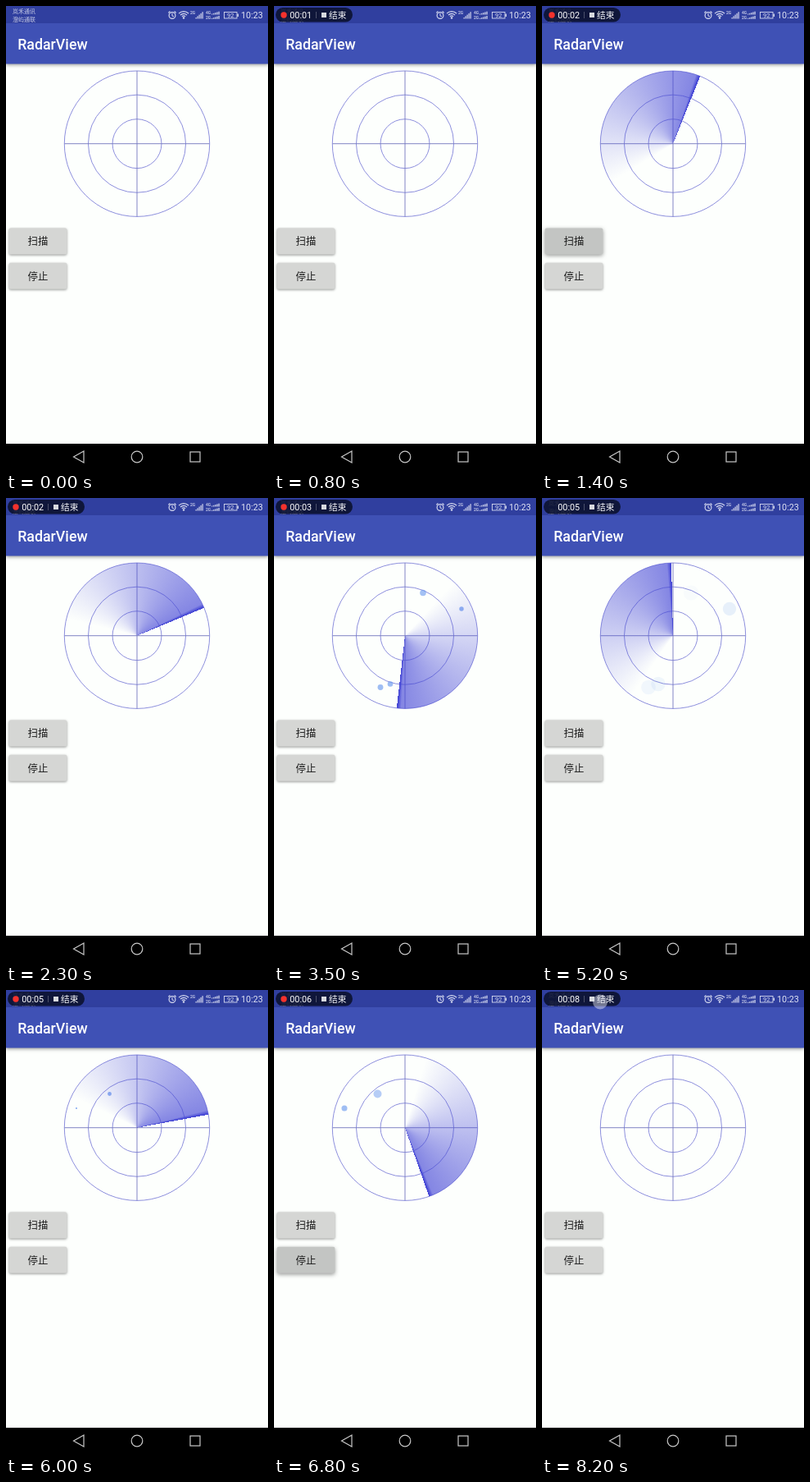
Recreate the animation shown at these times as an HTML page with a canvas. Size 320 px wide and 565 px high, loop 8.3 s.

```html
<!DOCTYPE html>
<html lang="zh">
<head>
<meta charset="utf-8">
<title>RadarView</title>
<style>
  html, body { margin: 0; width: 100%; height: 100%; overflow: hidden; background: #fdfffd; }
  canvas { display: block; width: 320px; height: 565px; }
</style>
</head>
<body>
<canvas id="stage" width="320" height="565"></canvas>
<script>
const ctx = document.getElementById('stage').getContext('2d');
const LOOP = 8300, STEP = 100, TAU = Math.PI * 2;
const LATIN = 'Roboto, "Noto Sans CJK SC", "Noto Sans CJK", sans-serif';
const HAN = '"Noto Sans CJK SC", "Noto Sans CJK", sans-serif';
const CENTER = { x: 160, y: 167.7 }, RADIUS = 88.7;
const SCAN = { start: 1150, stop: 7000 };

// [time in ms, value]
const SWEEP = [[1150, 0], [1400, 22], [2300, 67.5], [3500, 186.6], [4400, 277.8], [6000, 439.6], [7000, 541]];
const CLOCK = [[0, 1.1], [1400, 2.5], [2300, 2.9], [3500, 3.74], [4400, 4.48], [6000, 5.84], [8200, 8.05]];

const DROP_LIFE = 3000, DROP_GROWTH = 0.0032;
const DROPS = [
  { x: 182, y: 115.5, born: 2310 }, { x: 130, y: 230.5, born: 2430 },
  { x: 142, y: 226.5, born: 2470 }, { x: 229, y: 135, born: 2650 },
  { x: 126.5, y: 126.5, born: 5250 }, { x: 86, y: 144, born: 5700 }
];

function track(points, t) {
  let i = 1;
  while (i < points.length - 1 && t > points[i][0]) i++;
  const [t0, v0] = points[i - 1], [t1, v1] = points[i];
  return v0 + (v1 - v0) * (t - t0) / (t1 - t0);
}

function rect(x, y, w, h, color) {
  ctx.fillStyle = color;
  ctx.fillRect(x, y, w, h);
}

function disc(x, y, r, color) {
  ctx.fillStyle = color;
  ctx.beginPath();
  ctx.arc(x, y, r, 0, TAU);
  ctx.fill();
}

function ring(x, y, r, color, width = 1) {
  ctx.strokeStyle = color;
  ctx.lineWidth = width;
  ctx.beginPath();
  ctx.arc(x, y, r, 0, TAU);
  ctx.stroke();
}

function path(points, color, width = 1, closed = false) {
  ctx.strokeStyle = color;
  ctx.lineWidth = width;
  ctx.beginPath();
  points.forEach(([x, y]) => ctx.lineTo(x, y));
  if (closed) ctx.closePath();
  ctx.stroke();
}

function text(str, x, y, font, color, align = 'left') {
  ctx.font = font;
  ctx.fillStyle = color;
  ctx.textAlign = align;
  ctx.fillText(str, x, y);
}

function roundRect(x, y, w, h, r, color) {
  ctx.fillStyle = color;
  ctx.beginPath();
  ctx.roundRect(x, y, w, h, r);
  ctx.fill();
}

function signal(x, color) {
  for (let i = 0; i < 5; i++) rect(x + i * 2, 14 - i * 1.7, 1.2, 1.5 + i * 1.7, color);
}

function statusIcons() {
  const ink = '#d3d7ee';
  ring(203, 11.5, 3.9, ink, 1.2);
  path([[203, 9], [203, 12], [205, 12.7]], ink);
  path([[198.3, 8.4], [200.4, 6.5]], ink, 1.2);
  path([[205.6, 6.5], [207.7, 8.4]], ink, 1.2);

  for (const r of [3, 5.7, 8.4]) {
    ctx.strokeStyle = ink;
    ctx.lineWidth = 1.2;
    ctx.beginPath();
    ctx.arc(217, 15, r, -2.36, -0.78);
    ctx.stroke();
  }
  disc(217, 14.5, 1.2, ink);

  const tiny = '500 5px ' + LATIN;
  text('2G', 225, 10, tiny, ink);
  signal(231.5, ink);
  text('4G', 244, 10, tiny, ink);
  text('2G', 244, 15.7, tiny, ink);
  for (let i = 0; i < 5; i++) {
    rect(251 + i * 2.1, 9.5 - i * 0.7, 1.3, 1 + i * 0.7, ink);
    rect(251 + i * 2.1, 14.8 - i * 0.7, 1.3, 1 + i * 0.7, ink);
  }

  ctx.strokeStyle = ink;
  ctx.lineWidth = 0.9;
  ctx.strokeRect(266.5, 7.5, 15.5, 7.5);
  rect(282.5, 9.5, 1.5, 3.5, ink);
  text('92', 274.3, 14.1, '7.5px ' + LATIN, ink, 'center');
  text('10:23', 287, 15, '10.8px ' + LATIN, '#dfe2f3');
}

function recorder(t) {
  const clock = track(CLOCK, t);
  roundRect(2, 2, 94, 17.5, 8.7, 'rgba(10,16,42,0.86)');
  if (clock % 1 >= 0.5) disc(12, 11, 3.7, '#f5322d');
  text('00:0' + Math.floor(clock), 19.3, 15, '10.8px ' + LATIN, '#fff');
  rect(51, 7, 1, 8, 'rgba(255,255,255,0.25)');
  rect(58, 8, 6, 6, '#d8dadf');
  text('结束', 67, 15, '10.7px ' + HAN, '#f4f5f8');
}

function header(t) {
  rect(0, 0, 320, 21, '#303f9f');
  const carrier = '7px ' + HAN;
  text('岚禾通讯', 8, 8.6, carrier, '#c5cae5');
  text('澄屿通联', 8, 18.6, carrier, '#c5cae5');
  if (t >= 200) recorder(t);
  statusIcons();

  ctx.save();
  ctx.shadowColor = 'rgba(0,0,0,0.38)';
  ctx.shadowBlur = 4;
  ctx.shadowOffsetY = 1.5;
  rect(0, 21, 320, 49.5, '#3f51b5');
  ctx.restore();
  rect(0, 20, 320, 1, '#303f9f');
  text('RadarView', 14.2, 53, '500 17.8px ' + LATIN, '#fff');
}

function sweep(degrees) {
  const gradient = ctx.createConicGradient((degrees - 90) * Math.PI / 180, CENTER.x, CENTER.y);
  [[0, 0], [0.6, 0], [0.99, 0.66], [0.998, 1], [1, 1]].forEach(([at, alpha]) =>
    gradient.addColorStop(at, `rgba(70,72,214,${alpha})`));
  disc(CENTER.x, CENTER.y, RADIUS, gradient);
}

function radar(t) {
  const { x, y } = CENTER;
  for (const part of [1, 2, 3]) ring(x, y, RADIUS * part / 3 + (part < 3 ? 0.4 : 0), '#8183da', 0.9);
  path([[x - RADIUS, y], [x + RADIUS, y]], '#7477c0', 0.9);
  path([[x, y - RADIUS], [x, y + RADIUS]], '#7477c0', 0.9);
  if (t < SCAN.start || t >= SCAN.stop) return;

  for (const drop of DROPS) {
    const age = t - drop.born;
    if (age < 0 || age > DROP_LIFE) continue;
    disc(drop.x, drop.y, age * DROP_GROWTH, `rgba(105,152,238,${1 - age / DROP_LIFE})`);
  }
  sweep(track(SWEEP, t));
}

function button(label, y, pressed) {
  ctx.save();
  ctx.shadowColor = 'rgba(0,0,0,0.4)';
  ctx.shadowBlur = pressed ? 5 : 3;
  ctx.shadowOffsetY = pressed ? 1.6 : 1;
  roundRect(3.7, y, 70.6, 32, 1.8, pressed ? '#c3c5c3' : '#d5d6d4');
  ctx.restore();
  text(label, 39, y + 20.8, '500 12.4px ' + HAN, '#1c1c1c', 'center');
}

function navigation() {
  const ink = '#c9c9c9';
  rect(0, 533, 320, 32, '#000');
  path([[82.5, 549], [95, 542], [95, 556]], ink, 1.2, true);
  ring(160, 549, 6.8, ink, 1.2);
  ctx.strokeRect(225, 543, 12, 12);
}

function draw(t) {
  rect(0, 0, 320, 565, '#fdfffd');
  header(t);
  radar(t);
  button('扫描', 270.5, t >= 1000 && t < 1700);
  button('停止', 312.8, t >= 6800 && t < 7200);
  navigation();
  if (t >= 8150) disc(71, 14.5, 9, 'rgba(225,228,240,0.48)');
}

function tick() {
  const t = performance.now() % LOOP;
  draw(Math.floor(t / STEP) * STEP);
  requestAnimationFrame(tick);
}
tick();
</script>
</body>
</html>
```
